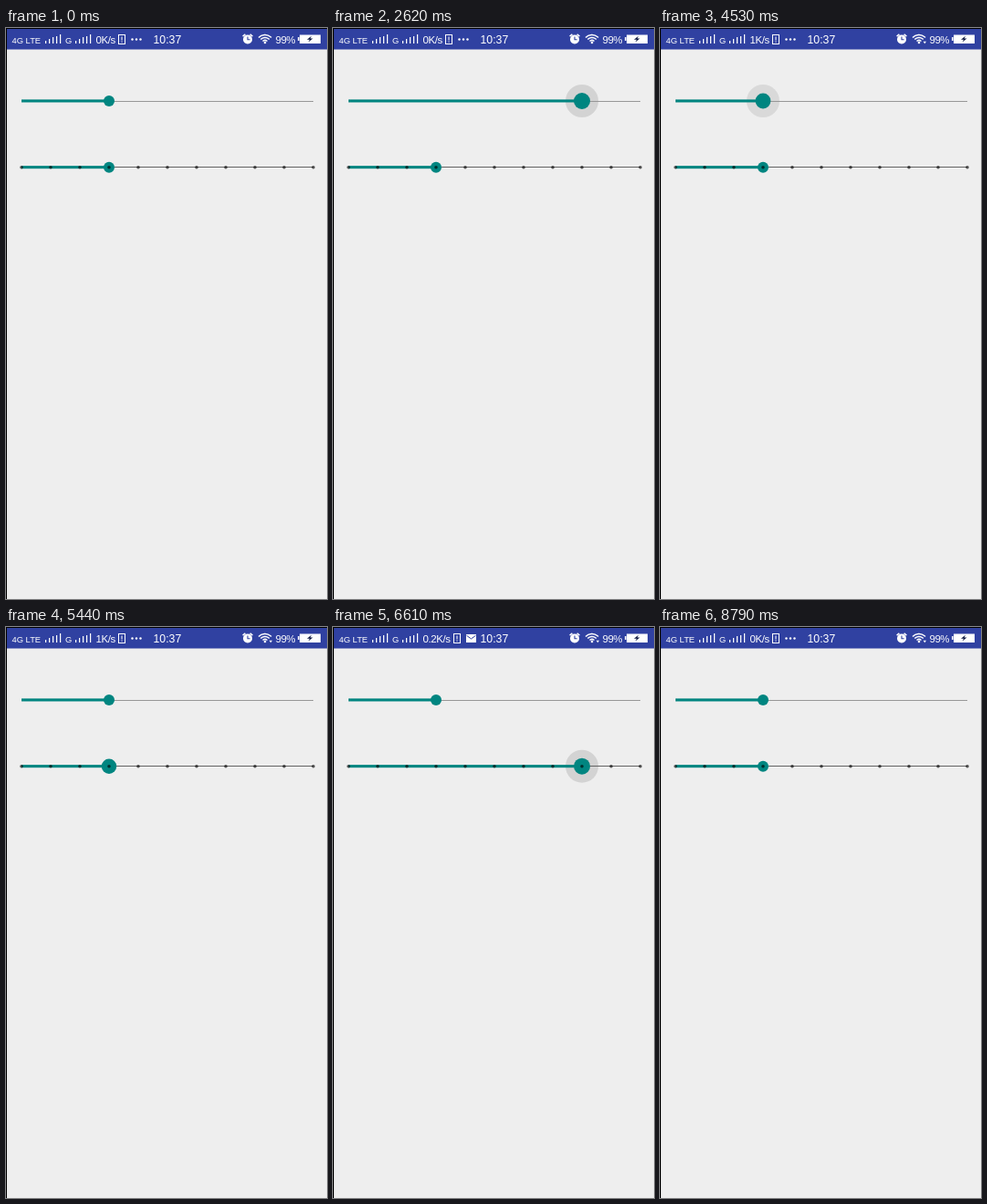
Recreate the animation shown at these times as an HTML page with a canvas. Size 352x626 px, loop 9410 ms.

```html
<!DOCTYPE html>
<html>
<head>
<meta charset="utf-8">
<style>
  html, body { margin: 0; width: 100%; height: 100%; overflow: hidden; background: #eee; }
  canvas { display: block; width: 352px; height: 626px; }
</style>
</head>
<body>
<canvas id="stage"></canvas>
<script>
const W = 352, H = 626, LOOP = 9410;
const BAR = '#3041a1', TEAL = '#008580', WHITE = '#fff';
const LEFT = 17, STEP = 32, STOPS = 10, FADE = 300;

const canvas = document.getElementById('stage');
const ctx = canvas.getContext('2d');
const dpr = window.devicePixelRatio || 1;
canvas.width = W * dpr;
canvas.height = H * dpr;
ctx.scale(dpr, dpr);

// The finger follows a few [time, value] points; the thumb snaps to stops.
const sliders = [
  { y: 80, row: 80, line: '#979797', ticks: false, down: 960, up: 4470,
    drag: [[1364, 3], [3190, 9.72], [3520, 5.49], [3940, 3.49]] },
  { y: 152.7, row: 152, line: '#636363', ticks: true, down: 5220, up: 7280,
    drag: [[5660, 3], [6060, 6.52], [6500, 9], [6605, 8.45], [7115, 3.45]] }
];

const ramp = (t, start, length) => Math.min(1, Math.max(0, (t - start) / length));

function follow(points, t) {
  let v = points[0][1];
  for (let i = 1; i < points.length; i++) {
    const [t0, v0] = points[i - 1], [t1, v1] = points[i];
    v += (v1 - v0) * ramp(t, t0, t1 - t0);
  }
  return v;
}

function rect(x, y, w, h, color) {
  ctx.fillStyle = color;
  ctx.fillRect(x, y, w, h);
}

function disc(x, y, r, color) {
  ctx.fillStyle = color;
  ctx.beginPath();
  ctx.arc(x, y, r, 0, Math.PI * 2);
  ctx.fill();
}

function path(points, color, width) {
  ctx.beginPath();
  points.forEach(([x, y]) => ctx.lineTo(x, y));
  if (width) {
    ctx.strokeStyle = color;
    ctx.lineWidth = width;
    ctx.stroke();
  } else {
    ctx.fillStyle = color;
    ctx.fill();
  }
}

function text(str, x, y, size, spacing = 0) {
  ctx.font = size + 'px "Liberation Sans", Roboto, sans-serif';
  ctx.letterSpacing = spacing + 'px';
  ctx.fillStyle = WHITE;
  ctx.fillText(str, x, y);
}

function signal(x) {
  for (let i = 0; i < 5; i++) {
    const h = Math.round(3 + i * 1.8);
    rect(x + i * 4, 17 - h, 1.2, h, WHITE);
  }
}

function simIcon(x) {
  ctx.strokeStyle = WHITE;
  ctx.lineWidth = 1;
  ctx.strokeRect(x + 0.5, 7.5, 7, 10);
  rect(x + 3.5, 9.5, 1, 4, WHITE);
  rect(x + 3.5, 14.5, 1, 1.2, WHITE);
}

function envelope() {
  rect(146, 8, 11, 9, WHITE);
  path([[146.5, 9.3], [151.5, 13], [156.5, 9.3]], BAR, 1);
}

function alarm() {
  disc(265, 12.5, 5, WHITE);
  path([[259.6, 9.2], [262.4, 6.9]], WHITE, 1.5);
  path([[267.6, 6.9], [270.4, 9.2]], WHITE, 1.5);
  path([[265, 9.5], [265, 12.8], [267.6, 12.8]], BAR, 1.1);
}

function wifi(active) {
  ctx.strokeStyle = WHITE;
  ctx.lineWidth = 1.5;
  for (let r = 3.3; r < 10; r += 3) {
    ctx.beginPath();
    ctx.arc(284, 16.7, r, -Math.PI * 0.77, -Math.PI * 0.23);
    ctx.stroke();
  }
  disc(284, 15.9, 1.3, WHITE);
  if (active) path([[288.6, 14.8], [292, 14.8], [290.3, 17.2]], WHITE);
}

function battery() {
  rect(322, 7.5, 23, 9.5, WHITE);
  rect(320, 10, 1.5, 4, WHITE);
  path([[335, 8.8], [330, 12.8], [333, 12.8], [331.5, 15.6], [336.5, 11.6], [333.7, 11.6]], '#111a44');
}

function statusBar(t) {
  const idle = t < 2920 || t >= 8790;
  const mail = !idle && t >= 5830;
  rect(0, 0, W, 23.5, BAR);
  text('4G LTE', 6.5, 17, 9.4);
  signal(43);
  text('G', 65, 17, 9.4);
  signal(76);
  text(idle ? '0K/s' : mail ? '0.2K/s' : '1K/s', 98.5, 16.8, 11.5, -0.4);
  simIcon(mail ? 132 : 123);
  if (mail) envelope();
  else for (let i = 0; i < 3; i++) disc(138.5 + i * 4.5, 12.5, 1.2, WHITE);
  text('10:37', 161.5, 17, 12.3);
  alarm();
  wifi(t >= 3700 && (t < 4770 || t >= 5440));
  text('99%', 295.5, 17, 11.5, -0.5);
  battery();
}

function slider(s, t) {
  const x = LEFT + STEP * Math.round(follow(s.drag, t));
  const release = 1 - ramp(t, s.up, FADE);
  const press = ramp(t, s.down, FADE) * release;
  const halo = ramp(t, s.down + 60, FADE * 1.3);
  disc(x, s.y, 18 * halo, `rgba(0,0,0,${0.115 * release})`);
  rect(LEFT, s.row, STEP * STOPS, 1, s.line);
  rect(LEFT, s.y - 1.6, x - LEFT, 3.1, TEAL);
  disc(x, s.y, 6 + 3 * press, TEAL);
  if (s.ticks) {
    for (let i = 0; i <= STOPS; i++) {
      disc(LEFT + STEP * i, s.y, 1.8, 'rgba(0,0,0,.64)');
    }
  }
}

function draw(t) {
  rect(0, 0, W, H, '#eee');
  statusBar(t);
  sliders.forEach(s => slider(s, t));
  rect(0, 0, W, 1, '#000');
  rect(0, 0, 1, H, '#000');
}

const start = performance.now();
function tick() {
  draw((performance.now() - start) % LOOP);
  requestAnimationFrame(tick);
}
tick();
</script>
</body>
</html>
```
